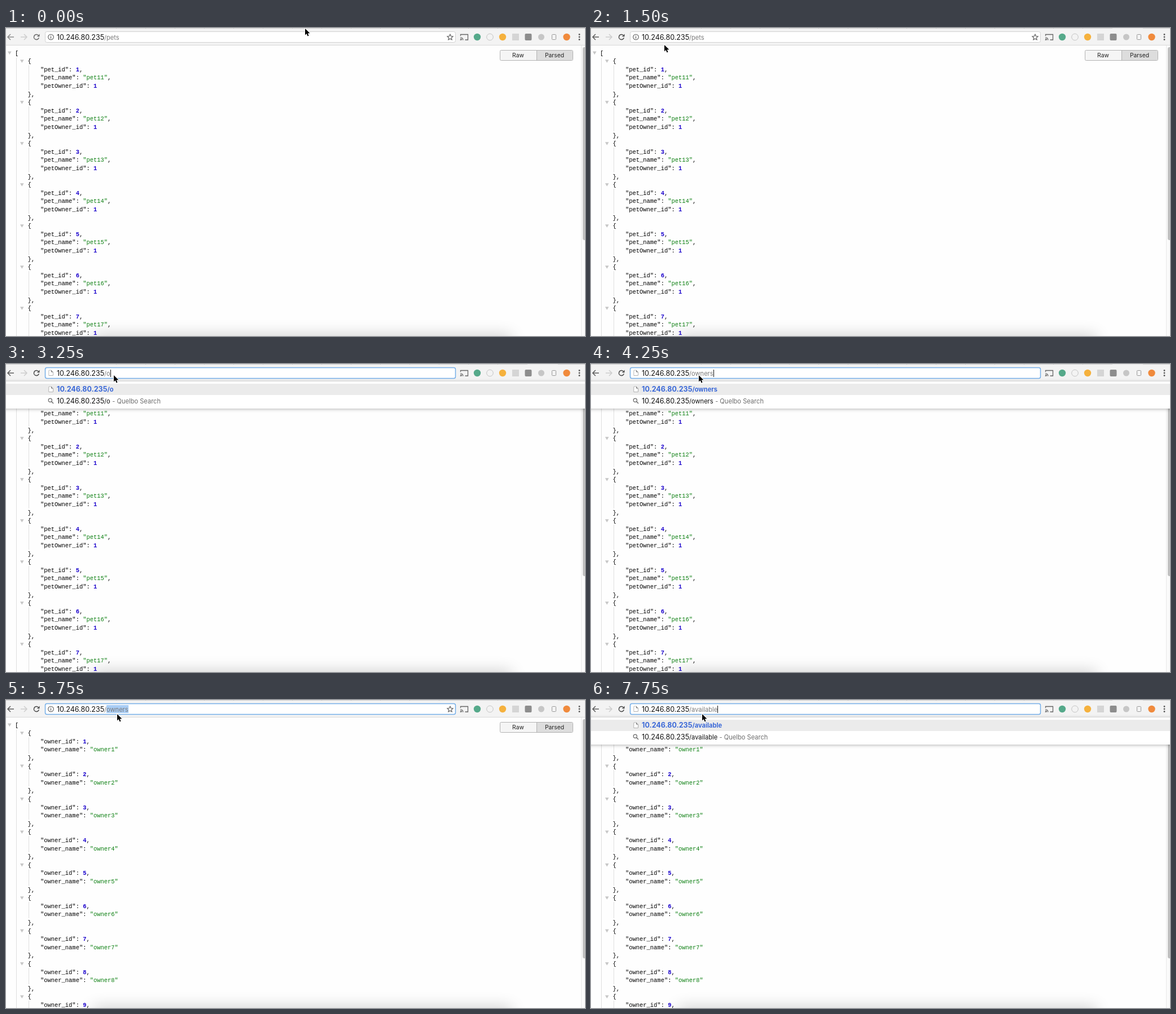
An HTML page with a canvas that plays this animation: 1026 px wide and 546 px high, repeating every 8 s.

```html
<!DOCTYPE html>
<html lang="en">
<head>
<meta charset="utf-8">
<title>JSON viewer</title>
<style>
  html, body { margin: 0; width: 100%; height: 100%; overflow: hidden; background: #fefefe; }
  canvas { display: block; width: 1026px; height: 546px; }
</style>
</head>
<body>
<canvas id="stage" width="1026" height="546"></canvas>
<script>
const ctx = document.getElementById('stage').getContext('2d');
const W = 1026, H = 546, LOOP = 8000;
const MONO = '"Liberation Mono", monospace';
const UI = 'Inter, sans-serif';
const HOST_FONT = '12.5px ' + UI;
const PATH_FONT = '11.1px ' + UI;
const HOST = '10.246.80.235';
const ENGINE = 'Quelbo Search';

// Each track holds [start time, value...] and jumps from one entry to the next.
const pointer = [
  [0, 530, 1], [250, 360, 11], [500, 151, 23], [750, 59, 20], [1000, 52, 24],
  [1250, 50, 24], [1500, 130, 30], [1750, 183, 30], [2000, 191, 20],
  [5000, 233, 1], [5250, 197, 25]
];
const address = [
  [0, 'pets', 'idle'], [2250, 'pets', 'path'],
  [3250, 'o', 'typing'], [3500, 'own', 'typing'], [3750, 'owne', 'typing'],
  [4000, 'owner', 'typing'], [4250, 'owners', 'typing'],
  [4500, 'owners', 'idle'], [5500, 'owners', 'all'], [5750, 'owners', 'path'],
  [6500, 'av', 'typing'], [6750, 'avai', 'typing'], [7000, 'availa', 'typing'],
  [7500, 'availabl', 'typing'], [7750, 'available', 'typing']
];
const at = (track, t) => track.filter(step => step[0] <= t).pop().slice(1);

function rect(x, y, w, h, color) {
  ctx.fillStyle = color;
  ctx.fillRect(x, y, w, h);
}

function round(x, y, w, h, r, fill, stroke, width = 1) {
  ctx.beginPath();
  ctx.roundRect(x, y, w, h, r);
  if (fill) { ctx.fillStyle = fill; ctx.fill(); }
  if (stroke) { ctx.strokeStyle = stroke; ctx.lineWidth = width; ctx.stroke(); }
}

function disc(x, y, r, color) {
  ctx.beginPath();
  ctx.arc(x, y, r, 0, Math.PI * 2);
  ctx.fillStyle = color;
  ctx.fill();
}

function ring(x, y, r, color, width, from = 0, to = Math.PI * 2) {
  ctx.beginPath();
  ctx.arc(x, y, r, from, to);
  ctx.strokeStyle = color;
  ctx.lineWidth = width;
  ctx.stroke();
}

function shape(points, fill, stroke, width = 1, close = true) {
  ctx.beginPath();
  points.forEach(([x, y]) => ctx.lineTo(x, y));
  if (close) ctx.closePath();
  if (stroke) { ctx.strokeStyle = stroke; ctx.lineWidth = width; ctx.stroke(); }
  if (fill) { ctx.fillStyle = fill; ctx.fill(); }
}

const line = (points, color, width) => shape(points, null, color, width, false);

function measure(str, font) {
  ctx.font = font;
  return ctx.measureText(str).width;
}

// Draws text and returns the x where it ends.
function text(str, x, y, font, color) {
  const end = x + measure(str, font);
  ctx.fillStyle = color;
  ctx.fillText(str, x, y);
  return end;
}

/* ---------- page ---------- */

const rowY = row => 44.4 + 14.6 * row;

function code(str, x, row, color = '#000', bold = false) {
  const font = (bold ? 'bold ' : '') + '10.45px ' + MONO;
  return text(str, x, Math.round(rowY(row) + 3.2), font, color);
}

function field(key, value, row, comma) {
  const isText = typeof value === 'string';
  let x = code('"' + key + '": ', 61, row);
  x = isText ? code('"' + value + '"', x, row, '#0b7f10')
             : code(String(value), x, row, '#1a01cc', true);
  if (comma) code(',', x, row);
}

function toggle(x, row) {
  const y = rowY(row) - 2.8;
  shape([[x, y], [x + 6.6, y], [x + 3.3, y + 5.6]], '#c6c6c6');
}

function record(fields, row) {
  toggle(25, row);
  code('{', 38.5, row);
  rect(40, Math.round(rowY(row) + 7), 1, Math.round(14.6 * fields.length), '#dedede');
  fields.forEach(([key, value], i) =>
    field(key, value, row + 1 + i, i < fields.length - 1));
  code('},', 38.5, row + fields.length + 1);
}

const petFields = n => [['pet_id', n], ['pet_name', 'pet1' + n], ['petOwner_id', 1]];
const ownerFields = n => [['owner_id', n], ['owner_name', 'owner' + n]];

function button(label, x, w) {
  ctx.textAlign = 'center';
  text(label, x + w / 2, 52, '10.3px ' + UI, '#222');
  ctx.textAlign = 'left';
}

function page(owners) {
  rect(0, 0, W, H, '#fefefe');
  toggle(3, 0);
  code('[', 16, 0);
  rect(18, 52, 1, H - 52, '#dedede');
  const fields = owners ? ownerFields : petFields;
  const step = owners ? 4 : 5;
  for (let n = 1; rowY(1 + (n - 1) * step) < H; n++) record(fields(n), 1 + (n - 1) * step);

  round(875.5, 39.5, 129, 18, 2, '#f5f5f5', '#b2b2b2');
  rect(940, 40, 64, 17, '#dddddd');
  rect(940, 39, 1, 19, '#b2b2b2');
  button('Raw', 875, 65);
  button('Parsed', 940, 64);

  rect(1019, 31, 7, H - 31, '#fafafa');
  rect(1019, 31, 1, H - 31, '#e9e9e9');
  round(1022, 34, 8, owners ? 424 : 342, 3, '#c1c1c1');

  ctx.save();
  ctx.shadowColor = 'rgba(0,0,0,.23)';
  ctx.shadowBlur = 28;
  rect(155, 546, 740, 20, '#999');
  ctx.restore();
}

/* ---------- toolbar ---------- */

function arrow(x, dir, color) {
  line([[x, 16], [x + dir * 11, 16]], color, 1.5);
  line([[x + dir * 5, 11], [x, 16], [x + dir * 5, 21]], color, 1.5);
}

function reload(color) {
  ring(54, 16, 4.5, color, 1.5, 0.3, 5.4);
  shape([[59.5, 10.5], [59.5, 15.2], [54.8, 15.2]], color);
}

function star(cx, cy) {
  const points = Array.from({ length: 10 }, (_, i) => {
    const r = i % 2 ? 2.5 : 5.4, a = -Math.PI / 2 + i * Math.PI / 5;
    return [cx + r * Math.cos(a), cy + r * Math.sin(a)];
  });
  shape(points, null, '#5a5a5a', 1.1);
}

function sheet(x, y) {
  shape([[x - 3.3, y - 4.7], [x + 1, y - 4.7], [x + 3.5, y - 2], [x + 3.5, y + 4.5],
    [x - 3.3, y + 4.5]], '#fff', '#666', 1);
  line([[x + 1, y - 4.7], [x + 1, y - 2], [x + 3.5, y - 2]], '#666', 1);
}

function info(x, y) {
  ring(x, y, 4.8, '#5a5a5a', 1.1);
  rect(x - 0.6, y - 0.8, 1.2, 3.6, '#5a5a5a');
  rect(x - 0.6, y - 2.8, 1.2, 1.2, '#5a5a5a');
}

function castIcon() {
  line([[805.5, 14], [805.5, 11.5], [818.5, 11.5], [818.5, 21], [813.5, 21]], '#666', 1.3);
  [2.6, 5].forEach(r => ring(805, 21.5, r, '#666', 1.2, -Math.PI / 2, 0));
  disc(805.6, 21, 0.9, '#666');
}

function extensions() {
  castIcon();
  disc(835, 16, 6.2, '#55a98a');
  ring(857.5, 16, 5.8, '#c4c4c4', 1);
  disc(880, 16, 6.2, '#f5b13d');
  rect(897, 10, 12, 12, '#d5d5d5');
  round(919.5, 10, 12, 12, 2, '#8d8d8d');
  disc(948.5, 16, 5.5, '#c6c6c6');
  round(967.5, 11.5, 7, 9, 1, null, '#999');
  disc(993.5, 16, 6.2, '#f08a3c');
  [11.5, 16, 20.5].forEach(y => disc(1016, y, 1.4, '#5a5a5a'));
}

function url(path, y, style) {
  const bold = style === 'match';
  const weight = bold ? '700 ' : '';
  const hostColor = bold ? '#3b69d8' : '#111';
  const pathColor = style === 'bar' ? '#7c7c7c' : hostColor;
  const join = text(HOST, 90, y, weight + HOST_FONT, hostColor);
  return text('/' + path, join, y, weight + PATH_FONT, pathColor);
}

function omnibox(path, mode) {
  const focus = mode !== 'idle', typing = mode === 'typing';
  round(69.5, 6.5, 727, 19, 3, '#fff', focus ? '#74aee8' : '#d2d2d2', focus ? 1.5 : 1);
  if (typing) sheet(79.5, 16);
  else { info(79.5, 16); star(787, 16.5); }

  if (mode === 'path' || mode === 'all') {
    const join = 90 + measure(HOST, HOST_FONT);
    const from = mode === 'all' ? 90 : join + measure('/', PATH_FONT);
    rect(from, 9, join + measure('/' + path, PATH_FONT) - from + 0.5, 14, '#a9cdf5');
  }
  const end = url(path, 20.6, 'bar');
  if (typing) rect(Math.round(end), 10, 1, 13, '#111');
}

function toolbar(t, path, mode) {
  const active = t >= 1000;
  rect(0, 0, W, 31, '#f3f3f3');
  rect(0, 0, W, 1, '#cfcfcf');
  if (active) rect(924, 0, 54, 1, '#e6e6e6');
  for (let x = 195; x < 920; x += 52) rect(x, 0, 1, 1, '#b5b5b5');
  rect(0, 30, W, 1, '#d9d9d9');

  if (t >= 1000 && t < 1500) round(44, 7, 19, 18, 3, t < 1250 ? '#e2e2e2' : '#d6d6d6');
  const ink = active ? '#5a5a5a' : '#8a8a8a';
  arrow(3, 1, ink);
  arrow(37, -1, '#cdcdcd');
  reload(active ? '#4a4a4a' : '#6a6a6a');
  omnibox(path, mode);
  extensions();
}

function suggestions(path) {
  ctx.save();
  ctx.shadowColor = 'rgba(0,0,0,.3)';
  ctx.shadowBlur = 6;
  ctx.shadowOffsetY = 1;
  rect(-10, 31, W + 20, 48, '#fff');
  ctx.restore();
  rect(0, 30, W, 1, '#d9d9d9');
  rect(0, 35, W, 20, '#ebebeb');
  sheet(79.5, 45);
  url(path, 49.3, 'match');

  ring(78.3, 64.3, 3.1, '#666', 1.2);
  line([[80.6, 66.6], [84, 70]], '#666', 1.4);
  const end = url(path, 69.8, 'plain');
  text('- ' + ENGINE, end + 3.5, 69.8, PATH_FONT, '#6c6c6c');
}

function cursor(x, y) {
  ctx.save();
  ctx.translate(x, y);
  ctx.lineJoin = 'round';
  shape([[0, 0], [0, 11.6], [2.7, 9.1], [4.6, 13.4], [6.5, 12.6], [4.7, 8.4], [8.4, 8.2]],
    '#000', '#fff', 2);
  ctx.restore();
}

function draw(t) {
  const [path, mode] = at(address, t);
  page(t >= 4500);
  toolbar(t, path, mode);
  if (mode === 'typing') suggestions(path);
  cursor(...at(pointer, t));
}

function frame() {
  draw(performance.now() % LOOP);
  requestAnimationFrame(frame);
}
frame();
</script>
</body>
</html>
```
